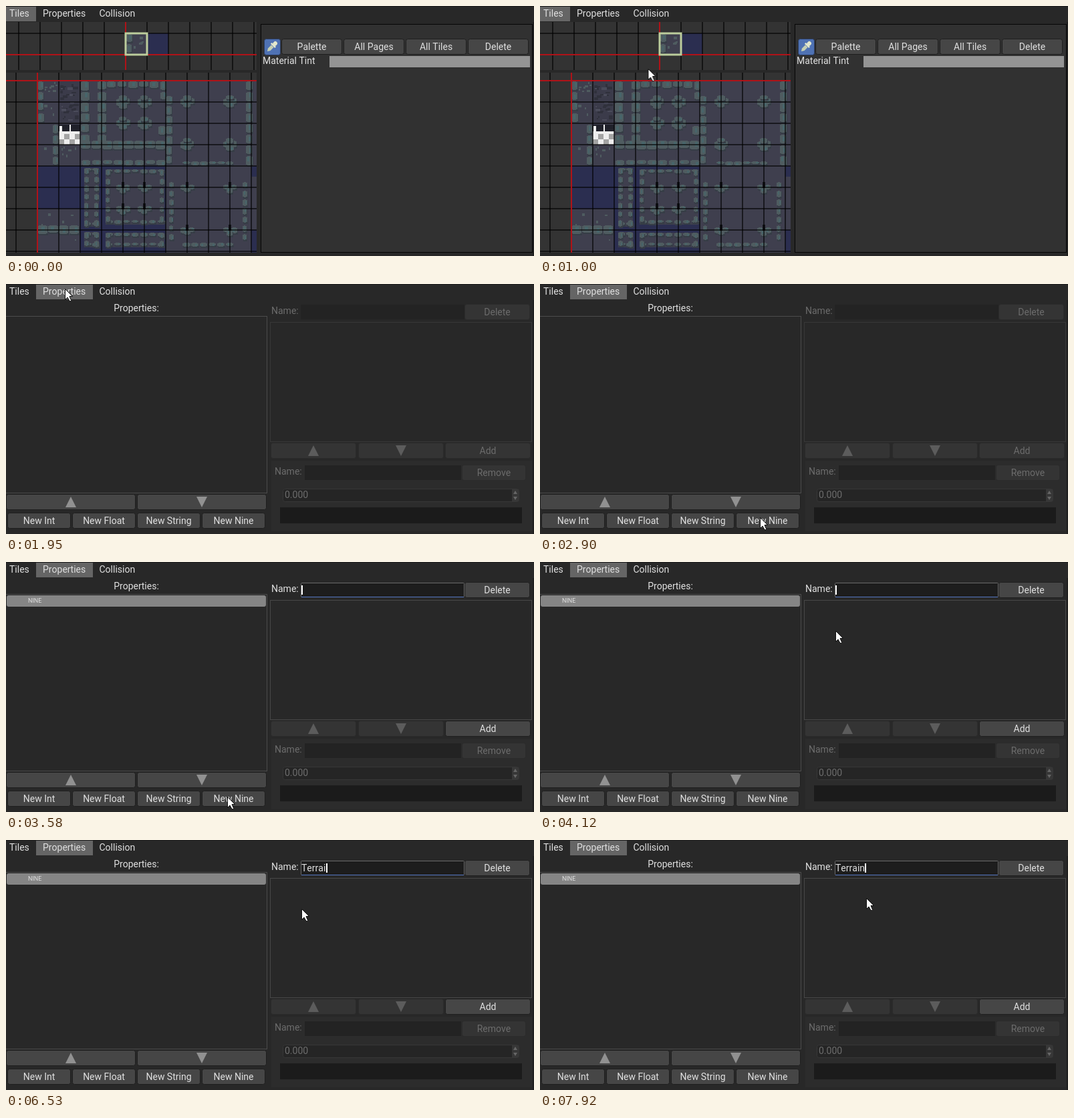
An HTML page with a canvas that plays this animation: 790x375 px, repeating every 8 s.

```html
<!DOCTYPE html>
<html lang="en">
<head>
<meta charset="utf-8">
<title>Tile set editor</title>
<style>
  html, body { margin: 0; width: 100%; height: 100%; overflow: hidden; background: #282828; }
  #stage { position: relative; width: 790px; height: 375px; overflow: hidden; }
  #stage > * { position: absolute; left: 0; top: 0; }
  text, #typed { font: 14px Roboto, sans-serif; font-kerning: none; fill: #e0e0e0; }
  .dim { fill: #6c6c6c; }
  .mid { text-anchor: middle; }
  .small { font-size: 9px; }

  .tab1, .hover, .tab2, .smear, .props, .off, .on, .press, #typed, #cursor {
    animation: 8s step-end infinite;
  }
  .tab1 { animation-name: tab1; }
  .hover { animation-name: hover; }
  .tab2 { animation-name: tab2; }
  .smear { animation-name: smear; }
  .props { animation-name: props; }
  .off { animation-name: off; }
  .on { animation-name: on; }
  .press { animation-name: press; }
  @keyframes tab1 { 0% { visibility: visible } 24.375%, 100% { visibility: hidden } }
  @keyframes hover { 0% { visibility: hidden } 21.125% { visibility: visible } 22.75%, 100% { visibility: hidden } }
  @keyframes tab2 { 0% { visibility: hidden } 22.75%, 100% { visibility: visible } }
  @keyframes smear { 0% { visibility: hidden } 15.125%, 100% { visibility: visible } }
  @keyframes props { 0% { visibility: hidden } 24.375%, 100% { visibility: visible } }
  @keyframes off { 0% { visibility: hidden } 24.375% { visibility: visible } 43.875%, 100% { visibility: hidden } }
  @keyframes on { 0% { visibility: hidden } 43.875%, 100% { visibility: visible } }
  @keyframes press { 0% { visibility: hidden } 42.25% { visibility: visible } 44.75%, 100% { visibility: hidden } }

  #stage > #typed {
    left: 442px; top: 35px; height: 14px; line-height: 14px; color: #e0e0e0;
    overflow: hidden; white-space: pre; border-right: 2px solid #fff; animation-name: type;
  }
  @keyframes type {
    0% { visibility: hidden; width: 0 }
    43.875% { visibility: visible; width: 0 }
    65.625% { visibility: visible; width: 9px }
    69.125% { visibility: visible; width: 16px }
    72.5% { visibility: visible; width: 21px }
    75% { visibility: visible; width: 26px }
    79.125% { visibility: visible; width: 33px }
    81.625% { visibility: visible; width: 37px }
    84.125%, 100% { visibility: visible; width: 44px }
  }

  #cursor { animation-name: move; }
  @keyframes move {
    0% { transform: translate(900px, 400px) }
    5.5% { transform: translate(431px, 347px); animation-timing-function: steps(3) }
    8.125% { transform: translate(320px, 243px); animation-timing-function: steps(3) }
    10.75% { transform: translate(193px, 124px); animation-timing-function: steps(5) }
    15.125% { transform: translate(114px, 49px) }
    16% { transform: translate(114px, 49px); animation-timing-function: steps(3, start) }
    18.625% { transform: translate(88px, 7px) }
    29.375% { transform: translate(88px, 7px); animation-timing-function: steps(2, start) }
    31.0875% { transform: translate(107px, 34px); animation-timing-function: steps(4, start) }
    34.525% { transform: translate(263px, 256px); animation-timing-function: steps(3, start) }
    37.075% { transform: translate(329px, 350px); animation-timing-function: steps(2, start) }
    38.85% { transform: translate(331px, 352px) }
    48.125% { transform: translate(331px, 352px); animation-timing-function: steps(5, start) }
    52.34% { transform: translate(442px, 103px) }
    95.75% { transform: translate(442px, 103px); animation-timing-function: steps(3, start) }
    98.975%, 100% { transform: translate(488px, 87px) }
  }
</style>
</head>
<body>
<div id="stage">
  <canvas id="map" width="790" height="375"></canvas>
  <svg id="ui" width="790" height="375"></svg>
  <div id="typed">Terrain</div>
  <svg id="cursor" width="12" height="19">
    <path d="M.5 .5V16.5L4 13L7 18.5H8.5L9.5 17.5L7 11.5H11.5Z" fill="#fff" stroke="#111"/>
  </svg>
</div>
<script>
const g = document.getElementById('map').getContext('2d');
const box = (c, x, y, w, h) => { g.fillStyle = c; g.fillRect(x, y, w, h); };

let seed = 7;
const rnd = n => (seed = (seed * 16807) % 2147483647) % n;

const FLOOR = '#3f3f4e', NAVY = '#2b2e50', ROCK = '#4f5c60', TEAL = '#48656a', SHADE = '#363d46';

function stone(x, y, w, h) {
  w -= rnd(2);
  h -= rnd(3);
  box(SHADE, x + 1, y + 2, w, h - 1);
  box(ROCK, x, y + 1, w, h - 3);
  box(ROCK, x + 2, y, w - 4, h - 1);
  box(TEAL, x + 2 + rnd(w / 2 | 0), y + 1 + rnd(h / 3 | 0), w / 3 | 0, h / 2 | 0);
}
function wall(w, h, x, y, n, dx, dy) {
  for (let i = 0; i < n; i++) stone(x + i * dx, y + i * dy, w, h);
}
function cluster(x, y, dark) {
  if (dark) {
    stone(x - 10, y - 4, 9, 10);
    stone(x + 2, y - 4, 9, 10);
    stone(x - 5, y + 1, 10, 9);
    box('#15161c', x - 2, y - 8, 4, 9);
    return;
  }
  stone(x - 10, y - 5, 11, 12);
  stone(x, y - 6, 11, 12);
  stone(x - 6, y - 10, 12, 9);
  stone(x - 6, y + 1, 12, 10);
}
function room(x, y, w, h) {
  box(FLOOR, x, y, w, h);
  const nx = Math.round(w / 13), ny = Math.round(h / 13);
  const dx = (w - 10) / (nx - 1) | 0, dy = (h - 10) / (ny - 1) | 0;
  for (const top of [y, y + h - 7]) wall(11, 7, x, top, nx, dx, 0);
  for (const left of [x, x + w - 7]) wall(7, 11, left, y, ny, 0, dy);
}
function debris(c, x, y, w, h, n, size = 4) {
  while (n--) box(c, x + rnd(w), y + rnd(h), 2 + rnd(size), 2 + rnd(3));
}
function grid(x0, y0, top, bottom) {
  const black = 'rgba(0,0,0,.6)', red = '#b01218';
  for (let x = x0 % 32; x < 375; x += 32) box(black, x, top, 2, bottom - top);
  for (let y = top + (y0 - top) % 32; y < bottom; y += 32) box(black, 0, y, 375, 2);
  box(red, x0, top, 2, bottom - top);
  box(red, 0, y0, 375, 2);
}

function drawMap() {
  box('#333', 0, 24, 375, 72);
  box('#333', 0, 100, 375, 270);

  // tile atlas
  g.save();
  g.beginPath();
  g.rect(47, 112, 328, 258);
  g.clip();
  box(FLOOR, 47, 112, 328, 258);
  box(NAVY, 47, 240, 64, 64);
  box(NAVY, 111, 240, 128, 130);
  box(NAVY, 367, 240, 8, 16);
  box(NAVY, 367, 336, 8, 34);
  box('#3b3b4a', 79, 112, 32, 64);
  debris('#30313c', 80, 114, 24, 58, 26, 8);
  debris('#4a4b5a', 80, 114, 24, 58, 8, 8);
  debris(ROCK, 57, 114, 18, 122, 14);
  debris(ROCK, 82, 210, 24, 16, 6);
  debris(ROCK, 50, 310, 56, 48, 9);
  wall(10, 14, 47, 113, 4, 0, 16);
  wall(9, 15, 70, 178, 4, 0, 16);
  wall(13, 15, 112, 113, 6, 0, 16);
  wall(13, 15, 137, 113, 6, 0, 16);
  wall(14, 11, 151, 113, 5, 16, 0);
  wall(15, 14, 112, 202, 8, 16, 0);
  wall(14, 9, 113, 231, 8, 16, 0);
  wall(9, 14, 231, 113, 2, 0, 16);
  wall(12, 15, 228, 180, 1, 0, 16);
  wall(10, 14, 239, 135, 7, 0, 15);
  wall(10, 15, 359, 113, 8, 0, 16);
  wall(15, 14, 47, 329, 4, 16, 0);
  wall(12, 7, 264, 233, 6, 13, 0);
  wall(7, 11, 244, 264, 7, 0, 13);
  wall(7, 11, 354, 264, 7, 0, 13);
  wall(12, 7, 264, 355, 6, 13, 0);
  room(117, 243, 22, 88);
  room(149, 245, 88, 83);
  room(117, 339, 22, 23);
  room(149, 340, 88, 22);
  for (const y of [144, 176]) for (const x of [175, 207]) {
    cluster(x, y);
    cluster(x, y + 128, true);
  }
  for (const x of [271, 335]) for (const y of [144, 208, 272, 336]) cluster(x, y, y > 240);

  // checkered gap
  box('#20212a', 79, 178, 32, 14);
  for (let i = 0; i < 8; i++) {
    const c = i % 4, r = i >> 2;
    box((c + r) % 2 ? '#a3a3a3' : '#eee', 79 + c * 8, 192 + r * 8, 8, 8);
  }
  box('#eee', 79, 188, 32, 4);
  box('#eee', 80, 180, 4, 8);
  box('#eee', 95, 178, 2, 10);
  g.restore();
  grid(46, 111, 100, 370);

  // selected tile
  box(FLOOR, 179, 41, 32, 32);
  box(NAVY, 211, 41, 32, 32);
  wall(9, 14, 180, 42, 2, 0, 15);
  debris(ROCK, 190, 44, 14, 22, 5);
  grid(178, 72, 24, 96);
  g.strokeStyle = '#bccd9c';
  g.lineWidth = 3;
  g.strokeRect(179, 41, 32, 32);
}

const rect = (x, y, w, h, fill, more = '') =>
  `<rect x="${x}" y="${y}" width="${w}" height="${h}" fill="${fill}" ${more}/>`;
const frame = (x, y, w, h, fill, line, r = 0) =>
  rect(x + .5, y + .5, w - 1, h - 1, fill, `stroke="${line}" rx="${r}"`);
const label = (s, x, y, cls = '') => `<text x="${x}" y="${y}" class="${cls}">${s}</text>`;
const face = (x, y, w, h, dim) =>
  frame(x, y, w, h, dim ? '#343434' : '#464646', dim ? '#2b2b2b' : '#1f1f1f', 3);
const button = (s, x, y, w, h, dim) =>
  face(x, y, w, h, dim) + label(s, x + w / 2, y + h / 2 + 5, dim ? 'mid dim' : 'mid');
const arrow = (x, y, w, h, up, dim) => {
  const cx = x + w / 2, cy = y + h / 2, k = up ? 8 : -8;
  return face(x, y, w, h, dim) +
    `<path d="M${cx - 8} ${cy + k}H${cx + 8}L${cx} ${cy - k}Z" fill="${dim ? '#5c5c5c' : '#919191'}"/>`;
};
const group = (cls, ...parts) => `<g class="${cls}">${parts.join('')}</g>`;

const tilesView = [
  rect(119, 72, 7, 2, '#1c1c1c', 'class="smear"'),
  frame(381, 27, 407, 343, '#313131', '#050505'),
  frame(386, 49, 25, 25, '#4f72b4', '#2b3c60', 3),
  `<g transform="translate(398 61) rotate(45)" fill="#e3e8cc">
    <rect x="-3" y="-10" width="6" height="7" rx="3"/><rect x="-4.500" y="-4" width="9" height="2.500"/>
    <path d="M-2.500 -1H2.500V6L0 10L-2.500 6Z" fill="#c5d0b4"/></g>`,
  ...['Palette', 'All Pages', 'All Tiles', 'Delete'].map((s, i) => button(s, 412 + i * 93, 49, 91, 24)),
  label('Material Tint', 384, 87),
  rect(484, 75, 300, 17, '#949494')
];

const propsView = group('props',
  rect(0, 23, 790, 352, '#282828'),
  label('Properties:', 195, 41, 'mid'),
  frame(-1, 48, 392, 266, '#282828', '#4c4c4c'),
  arrow(0, 315, 194, 24, true),
  arrow(196, 315, 194, 24, false),
  ...['Int', 'Float', 'String', 'Nine'].map((s, i) => button('New ' + s, 2 + i * 97, 343, 95, 24)),
  rect(294, 344, 93, 22, '#fff', 'class="press" opacity=".1"'),
  arrow(396, 238, 128, 24, true, true),
  arrow(527, 238, 128, 24, false, true),
  rect(397, 265, 390, 106, '#2c2c2c'),
  label('Name:', 402, 286, 'dim'),
  rect(447, 272, 234, 22, '#232323'),
  button('Remove', 682, 271, 96, 24, true),
  frame(414, 307, 354, 20, '#252525', '#373737', 3),
  label('0.000', 417, 321, 'dim'),
  rect(757, 308, 10, 18, '#373737'),
  '<path d="M759 315h6l-3 -5zM759 319h6l-3 5z" fill="#666"/>',
  rect(410, 335, 362, 24, '#1b1b1b'));

const offView = group('off',
  label('Name:', 397, 45, 'dim'),
  rect(441, 31, 245, 22, '#232323'),
  button('Delete', 686, 30, 98, 24, true),
  frame(395, 57, 392, 180, '#282828', '#383838'),
  button('Add', 657, 238, 128, 24, true));

const onView = group('on',
  rect(1, 50, 388, 17, '#858585', 'rx="3"'),
  label('NINE', 33, 61, 'small'),
  label('Name:', 397, 45),
  frame(441, 31, 245, 22, '#1d1d1d', '#6a6a6a', 1),
  rect(442, 52, 243, 1, '#5577c4'),
  button('Delete', 686, 30, 98, 24),
  frame(395, 57, 392, 180, '#282828', '#484848'),
  button('Add', 657, 238, 128, 24));

const tabs = [
  rect(0, 0, 790, 1, '#1c1c1c'),
  rect(788, 24, 2, 351, '#1f1f1f'),
  rect(0, 1, 45, 22, '#656565', 'class="tab1"'),
  rect(45, 1, 85, 22, '#484848', 'class="hover"'),
  rect(45, 1, 85, 22, '#656565', 'class="tab2"'),
  label('Tiles', 5, 16),
  label('Properties', 55, 16),
  label('Collision', 139.5, 16)
];

drawMap();
document.getElementById('ui').innerHTML =
  [...tilesView, propsView, offView, onView, ...tabs].join('');
</script>
</body>
</html>
```
